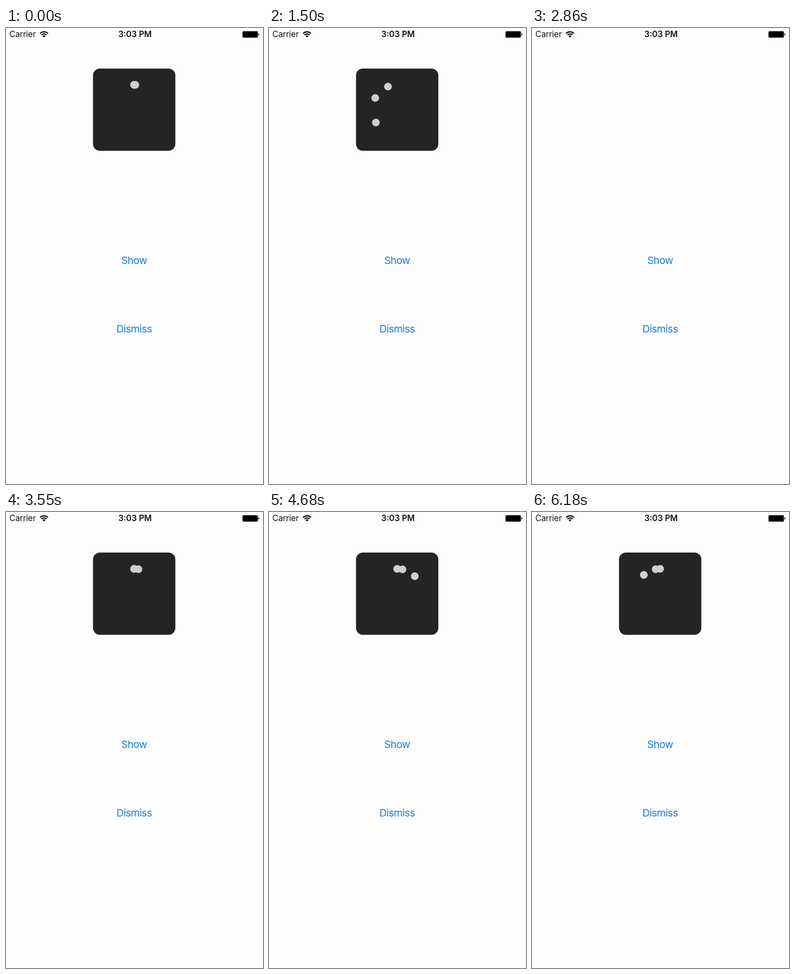
These frames come from a looping animation (480 by 852 pixels, 6.22 s). An HTML page:

```html
<!DOCTYPE html>
<html lang="en">
<head>
<meta charset="utf-8">
<title>Loading indicator</title>
<style>
  html, body { margin: 0; width: 100%; height: 100%; overflow: hidden; background: #fefdfe; }
  svg { display: block; width: 100%; height: 100%; }
  text { font-family: Inter, sans-serif; }
  .status { font-size: 15.4px; fill: #111; }
  .button { font-size: 19.2px; letter-spacing: -.03em; text-anchor: middle; fill: #1b7cd8; }
</style>
</head>
<body>
<svg viewBox="0 0 480 852">
  <text class="status" x="6.3" y="17.3" letter-spacing="-.01em">Carrier</text>
  <g fill="none" stroke="#111" stroke-width="2.3">
    <path d="M63.6 10.2a10.6 10.6 0 0 1 14.8 0M66.2 13a6.9 6.9 0 0 1 9.6 0"/>
    <path d="M71 17.8l-2.7-2.8a3.9 3.9 0 0 1 5.4 0z" fill="#111" stroke="none"/>
  </g>
  <text class="status" x="241" y="17.3" text-anchor="middle" font-weight="600">3:03 PM</text>
  <rect x="441.8" y="6" width="28.6" height="12" rx="2" fill="#000" stroke="#777" stroke-width=".8"/>
  <path d="M471.4 10q2 .4 2 2t-2 2z" fill="#222"/>

  <g id="card">
    <rect x="162.5" y="75.7" width="153.8" height="153.8" rx="13" fill="#252326"/>
    <g id="dots" fill="#d0cfd0"></g>
  </g>

  <text class="button" x="239.3" y="440.6">Show</text>
  <text class="button" x="239.3" y="569">Dismiss</text>
</svg>
<script>
const LOOP = 6220, TURN = 685, LAG = 79;
const STARTS = [-42, 934, 1928, 3470, 4512, 5499];
const HIDE = 2300, SHOW = 3480;
const CENTER = { x: 239.3, y: 152.6 }, RADIUS = 46.4;

const card = document.getElementById('card');
const dots = Array.from({ length: 3 }, () => {
  const dot = document.createElementNS('http://www.w3.org/2000/svg', 'circle');
  dot.setAttribute('r', 7.2);
  return document.getElementById('dots').appendChild(dot);
});

// cubic-bezier(.42, 0, .58, 1), solved by bisection
function easeInOut(x) {
  if (x <= 0 || x >= 1) return x <= 0 ? 0 : 1;
  let low = 0, high = 1;
  for (let i = 0; i < 20; i++) {
    const s = (low + high) / 2;
    if (1.26 * s - .78 * s * s + .52 * s ** 3 < x) low = s; else high = s;
  }
  return low * low * (3 - 2 * low);
}

function draw(time) {
  const start = STARTS.findLast(s => s <= time);
  card.style.display = time >= HIDE && time < SHOW ? 'none' : '';
  dots.forEach((dot, i) => {
    const angle = 2 * Math.PI * easeInOut((time - start - i * LAG) / TURN);
    dot.setAttribute('cx', CENTER.x + RADIUS * Math.sin(angle));
    dot.setAttribute('cy', CENTER.y - RADIUS * Math.cos(angle));
  });
}

const origin = performance.now();
function tick() {
  draw((performance.now() - origin) % LOOP);
  requestAnimationFrame(tick);
}
tick();
</script>
</body>
</html>
```
